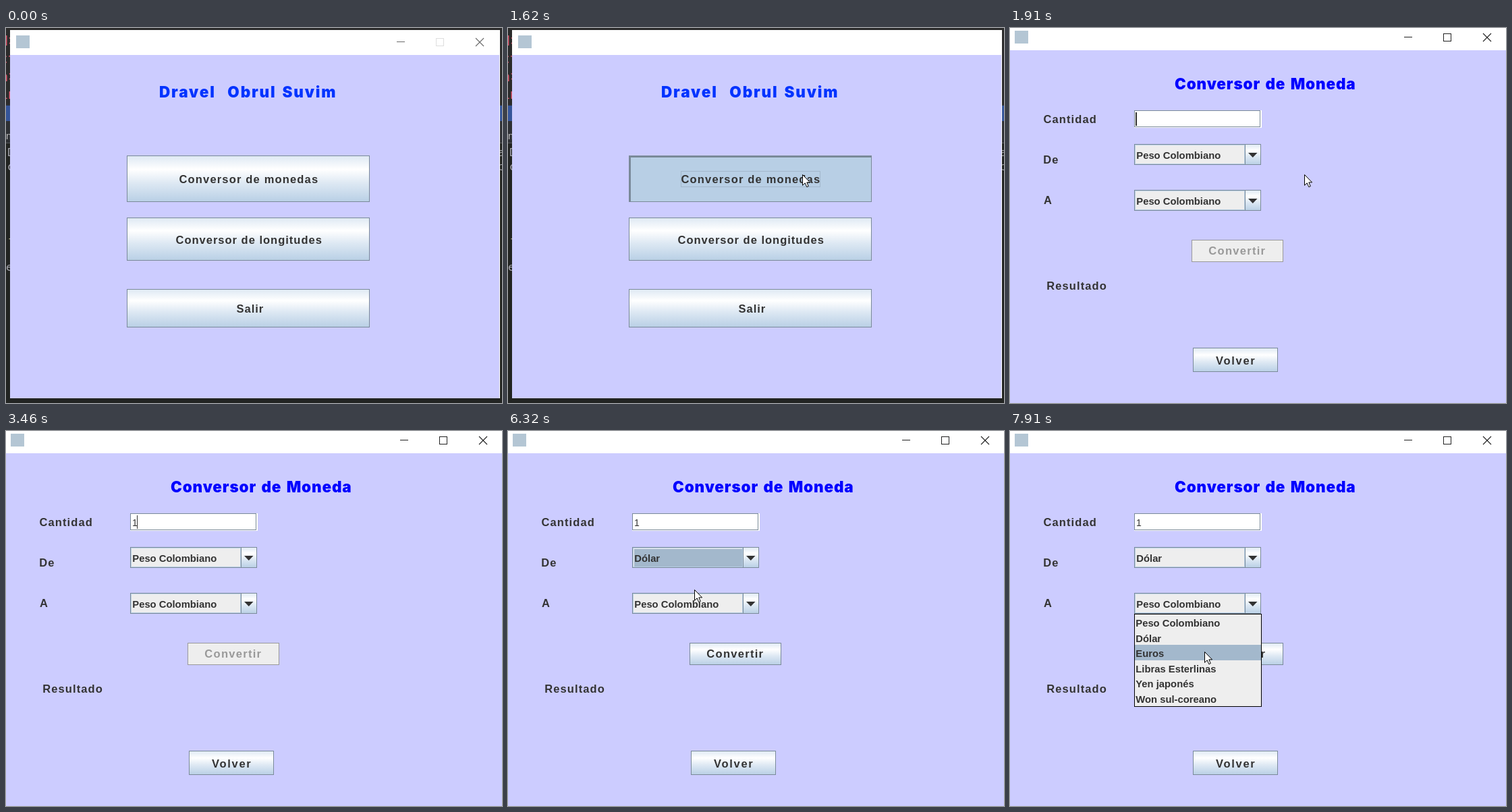
An HTML page that plays this animation: 735x556 px, repeating every 8000 ms.

```html
<!DOCTYPE html>
<html lang="es">
<head>
<meta charset="utf-8">
<title>Conversor</title>
<style>
html, body { margin: 0; width: 100%; height: 100%; overflow: hidden; background: #242424; }
svg { display: block; width: 735px; height: 556px; }
text { font: bold 16.5px "Liberation Sans", Arial, sans-serif; fill: #333; white-space: pre; }
text.title { font: 900 22.5px Inter, "Liberation Sans", sans-serif; }
text.code { font: 20px "Noto Sans Mono", "DejaVu Sans Mono", monospace; fill: #e4e4f0; }
text.log { font-size: 16.6px; }
text.small { font-size: 14.8px; }
rect { shape-rendering: crispEdges; }
</style>
</head>
<body>
<svg id="stage" viewBox="0 0 735 556">
  <defs>
    <linearGradient id="steel" x2="0" y2="1">
      <stop offset="0" stop-color="#dde8f3"/>
      <stop offset=".3" stop-color="#fff"/>
      <stop offset=".6" stop-color="#dde8f3"/>
      <stop offset="1" stop-color="#b8cfe5"/>
    </linearGradient>
  </defs>
</svg>
<script>
const LOOP = 8000;
const EDGE = '#7a8a99', PALE = '#b8cfe5', PICK = '#a3b8cc', GREY = '#eee', LILAC = '#ccccff';
const stage = document.getElementById('stage');

function add(parent, tag, attrs = {}, content) {
  const el = document.createElementNS('http://www.w3.org/2000/svg', tag);
  for (const k in attrs) el.setAttribute(k, attrs[k]);
  if (content !== undefined) el.textContent = content;
  parent.appendChild(el);
  return el;
}
const group = parent => add(parent, 'g');
const box = (p, x, y, width, height, fill) => add(p, 'rect', { x, y, width, height, fill });
const frame = (p, x, y, w, h, stroke) =>
  add(p, 'rect', { x: x + .5, y: y + .5, width: w - 1, height: h - 1, fill: 'none', stroke });
const line = (p, d, stroke, width = 1) =>
  add(p, 'path', { d, stroke, fill: 'none', 'stroke-width': width });
const label = (p, x, y, str, gap = 1.1, extra = {}) =>
  add(p, 'text', { x, y, 'letter-spacing': gap, ...extra }, str);

// Timeline: rows are [time, properties]
function play(el, rows, easing) {
  const keys = rows.map(([t, props]) => ({ offset: t / LOOP, easing, ...props }));
  keys.push({ ...keys[keys.length - 1], offset: 1 });
  el.animate(keys, { duration: LOOP, iterations: Infinity });
}
function show(el, ...spans) {
  const rows = spans[0][0] > 0 ? [[0, { opacity: 0 }]] : [];
  for (const [from, to] of spans) {
    rows.push([from, { opacity: 1 }]);
    if (to < LOOP) rows.push([to, { opacity: 0 }]);
  }
  play(el, rows, 'step-end');
}
const pose = (opacity, x, y, s) => ({ opacity, transform: `translate(${x}px,${y}px) scale(${s})` });

function button(p, x, y, w, h) {
  box(p, x, y, w, h, 'url(#steel)');
  frame(p, x, y, w, h, EDGE);
}
function rollover(p, x, y, w, h, ...spans) {
  const g = group(p);
  frame(g, x, y, w, h, PALE);
  frame(g, x + 1, y + 1, w - 2, h - 2, EDGE);
  frame(g, x + 2, y + 2, w - 4, h - 4, PALE);
  show(g, ...spans);
}
function controls(p, x, y, color, maxColor) {
  const g = group(p);
  line(g, `M${x} ${y + 5.5}h12`, color);
  frame(g, x + 58, y, 12, 12, maxColor);
  line(g, `M${x + 117} ${y}l12 12m0-12l-12 12`, color, 1.1);
  return g;
}

// Editor behind the windows
function buildEditor() {
  const g = group(stage);
  box(g, 0, 0, 735, 113, '#2b2b2b');
  box(g, 0, 113, 735, 57, '#2e3034');
  box(g, 0, 115, 735, 23, '#35559a');
  box(g, 0, 170, 735, 386, '#222422');
  box(g, 0, 170, 735, 1, '#55585c');
  const rows = [
    [26, 'd>', 'com.dravel.obrul', '</groupId>'],
    [52, 'ctId>', 'ConversorDeMoneda', '</artifactId>'],
    [79, 'n>', '1.0-SNAPSHOT', '</version>'],
    [105, 'ing>', 'jar', '</packaging>']
  ];
  for (const [y, open, body, close] of rows) {
    const t = add(g, 'text', { x: -9, y, class: 'code' });
    add(t, 'tspan', { fill: '#e0566e' }, open);
    add(t, 'tspan', {}, body);
    add(t, 'tspan', { fill: '#e0566e' }, close);
  }
  label(g, 0, 165, 'nts\\NetBeansProjects\\ConversorDeMoneda  ×', 0,
    { style: 'font-weight:400;font-size:14.6px;fill:#bbb' });
  const log = (x, y, str, fill = '#a6a6ae') =>
    add(g, 'text', { x, y, class: 'code log', style: `fill:${fill}` }, str);
  log(2, 190, 'DeMoneda; "JAVA_HOME=C:\\\\Program Files\\\\Java\\\\jdk-17" cmd /c "\\"C:\\\\Program');
  log(2, 211, 'cution is skipped and output directories of dependency projects (with Compile');
  log(13, 276, '>' + '-'.repeat(16), '#b8b088');
  log(2, 317, '-'.repeat(19), '#b8b088');
  log(0, 360, 'ersorDeMoneda ---');
}

// Start menu
function buildMenu() {
  const g = group(stage);
  box(g, 6, 3, 726, 546, '#fff');
  box(g, 6, 40, 725, 509, LILAC);
  box(g, 15, 11, 20, 19, '#b4c6d4');
  show(controls(g, 579, 15, '#6a6a6a', '#dedede'), [0, 1490]);
  label(g, 227, 103, 'Dravel  Obrul Suvim', 1.85,
    { class: 'title', 'word-spacing': 2.5, style: 'fill:#0033ff' });

  button(g, 179, 189, 360, 69);
  button(g, 179, 281, 360, 64);
  button(g, 179, 387, 360, 57);
  rollover(g, 179, 281, 360, 64, [680, 800]);
  rollover(g, 179, 189, 360, 69, [860, 1490]);

  const down = group(g);
  box(down, 179, 189, 360, 69, PALE);
  frame(down, 179, 189, 360, 69, EDGE);
  box(down, 179, 189, 360, 3, EDGE);
  box(down, 179, 189, 3, 69, EDGE);
  frame(down, 256, 212, 207, 24, PICK);
  show(down, [1490, LOOP]);

  label(g, 256.5, 230, 'Conversor de monedas', 1.17);
  label(g, 251.5, 320, 'Conversor de longitudes', 1);
  label(g, 341.5, 422, 'Salir', 1);

  play(g, [
    [0, pose(1, 0, 0, 1)], [1690, pose(.5, 11, 7, .97)],
    [1780, pose(.04, 17, 11, .95)], [1840, pose(0, 17, 11, .95)]
  ], 'step-end');
}

function combo(p, y, lit) {
  box(p, 184, y, 188, 31, GREY);
  frame(p, 185, y + 1, 163, 29, PALE);
  const pick = box(p, 187, y + 3, 160, 26, PICK);
  if (lit) show(pick, lit); else pick.remove();
  box(p, 348, y, 24, 31, 'url(#steel)');
  frame(p, 184, y, 188, 31, EDGE);
  frame(p, 348, y, 24, 31, EDGE);
  add(p, 'path', { d: `M353 ${y + 13}h13.5l-6.7 7z`, fill: '#333' });
}
const comboText = (p, y, str) => label(p, 187.3, y + 21.5, str, 0, { class: 'small' });

const coins = ['Peso Colombiano', 'Dólar', 'Euros', 'Libras Esterlinas', 'Yen japonés', 'Won sul-coreano'];
function popup(p, y, span, picks) {
  const g = group(p), pitch = 22.6;
  box(g, 184, y, 189, 138, GREY);
  picks.forEach((s, i) => show(box(g, 185, y + 1 + i * pitch, 187, 22.6, PICK), s));
  frame(g, 184, y, 189, 138, '#000');
  coins.forEach((c, i) => label(g, 186.3, y + 19 + i * pitch, c, 0, { class: 'small' }));
  show(g, span);
}

// Currency form
function buildForm() {
  const g = group(stage);
  box(g, -1, -2, 738, 559, LILAC);
  box(g, -1, -2, 738, 35, '#fff');
  frame(g, -2, -3, 740, 561, '#222');
  box(g, 7, 4, 20, 19, '#b4c6d4');
  controls(g, 584, 8, '#222', '#222');
  label(g, 244, 91, 'Conversor de Moneda', .86,
    { class: 'title', 'word-spacing': 2, style: 'fill:#0000ff' });
  label(g, 49.5, 141, 'Cantidad');
  label(g, 49.2, 201, 'De');
  label(g, 50, 261, 'A');
  label(g, 54.3, 388, 'Resultado');

  box(g, 184, 122, 189, 26, '#fff');
  frame(g, 184, 122, 187, 25, EDGE);
  show(box(g, 186, 125, 2, 20, '#333'), [1690, 2200], [2700, 3190]);
  show(label(g, 187, 141, '1', 0, { style: 'font-weight:400;font-size:14px' }), [3460, LOOP]);
  show(box(g, 194, 125, 1, 20, '#333'), [3460, 3980], [4500, 4980]);

  combo(g, 172, [6120, 6790]);
  show(comboText(g, 172, coins[0]), [0, 6120]);
  show(comboText(g, 172, coins[1]), [6120, LOOP]);
  combo(g, 240);
  comboText(g, 240, coins[0]);

  box(g, 269, 314, 136, 33, GREY);
  frame(g, 269, 314, 136, 33, '#999');
  label(g, 294.3, 336, 'Convertir', 1.3, { style: 'fill:#999' });
  const ready = group(g);
  button(ready, 269, 314, 136, 33);
  label(ready, 294.3, 336, 'Convertir', 1.3);
  show(ready, [3520, LOOP]);

  button(g, 271, 474, 126, 36);
  label(g, 305, 499, 'Volver', 1.7);

  popup(g, 203, [4980, 6120], [[4980, 5760], [5760, 6120]]);
  popup(g, 271, [6790, LOOP], [[6790, 7610], [7610, 7770], [7770, LOOP]]);

  play(g, [
    [0, pose(0, 13, 10, .96)], [1690, pose(.3, 13, 10, .96)], [1780, pose(.79, 3.5, 3, .989)],
    [1840, pose(.96, .7, .6, .998)], [1910, pose(1, 0, 0, 1)]
  ], 'step-end');
}

// Mouse pointer
function buildPointer() {
  const g = group(stage);
  const ink = { fill: '#fff', stroke: '#000', 'stroke-linejoin': 'round' };
  const arrow = add(g, 'path', { ...ink, d: 'M.5.5V16.3L4.2 12.8 6.8 18.7 9.3 17.6 6.8 11.9H11.6Z' });
  const beam = line(g, 'M-3.5-9.5h3l.5.5.5-.5h3M0-9V9M-3.5 9.5h3l.5-.5.5.5h3', '#000');
  const hand = group(g);
  add(hand, 'path', { ...ink, d: 'M-2 2a2 2 0 0 1 4 0V8q2.6-1.5 3.4.7q2.4-.8 3 1.3q1.7-.2 1.8 2V16q0 3-2 5v2.7H-2.5V21.5L-7.5 14q-1.3-2.5.3-3.2q1.5-.5 3 1.2L-2 14Z' });
  line(hand, 'M2 8v4M5.4 8.7v3.6M8.4 10v2.5', '#000');

  show(arrow, [410, 2340], [4150, 4450], [5560, 6450], [7480, LOOP]);
  show(beam, [2340, 3460], [3980, 4150]);
  show(hand, [4450, 5560], [6450, 7480]);

  const stops = [
    [0, 679, 514], [410, 679, 514], [540, 600, 430], [750, 500, 300], [950, 445, 228], [1160, 436, 217],
    [2040, 436, 217], [2240, 286, 147], [2310, 286, 147], [2510, 268, 130], [2640, 268, 130],
    [2710, 288, 137], [3980, 288, 137], [4200, 296, 150], [4450, 318, 172], [4720, 351, 178],
    [4790, 351, 178], [4900, 357, 182], [5250, 357, 182], [5380, 351, 168], [5560, 340, 203],
    [5750, 298, 226], [5990, 276, 235], [6390, 276, 235], [6650, 359, 259], [7250, 359, 260],
    [7390, 359, 260], [7480, 352, 271], [7640, 322, 300], [7780, 298, 318], [7905, 288, 327]
  ];
  play(g, stops.map(([t, x, y]) => [t, { transform: `translate(${x}px,${y}px)` }]), 'linear');
}

buildEditor();
buildMenu();
buildForm();
buildPointer();
</script>
</body>
</html>
```
